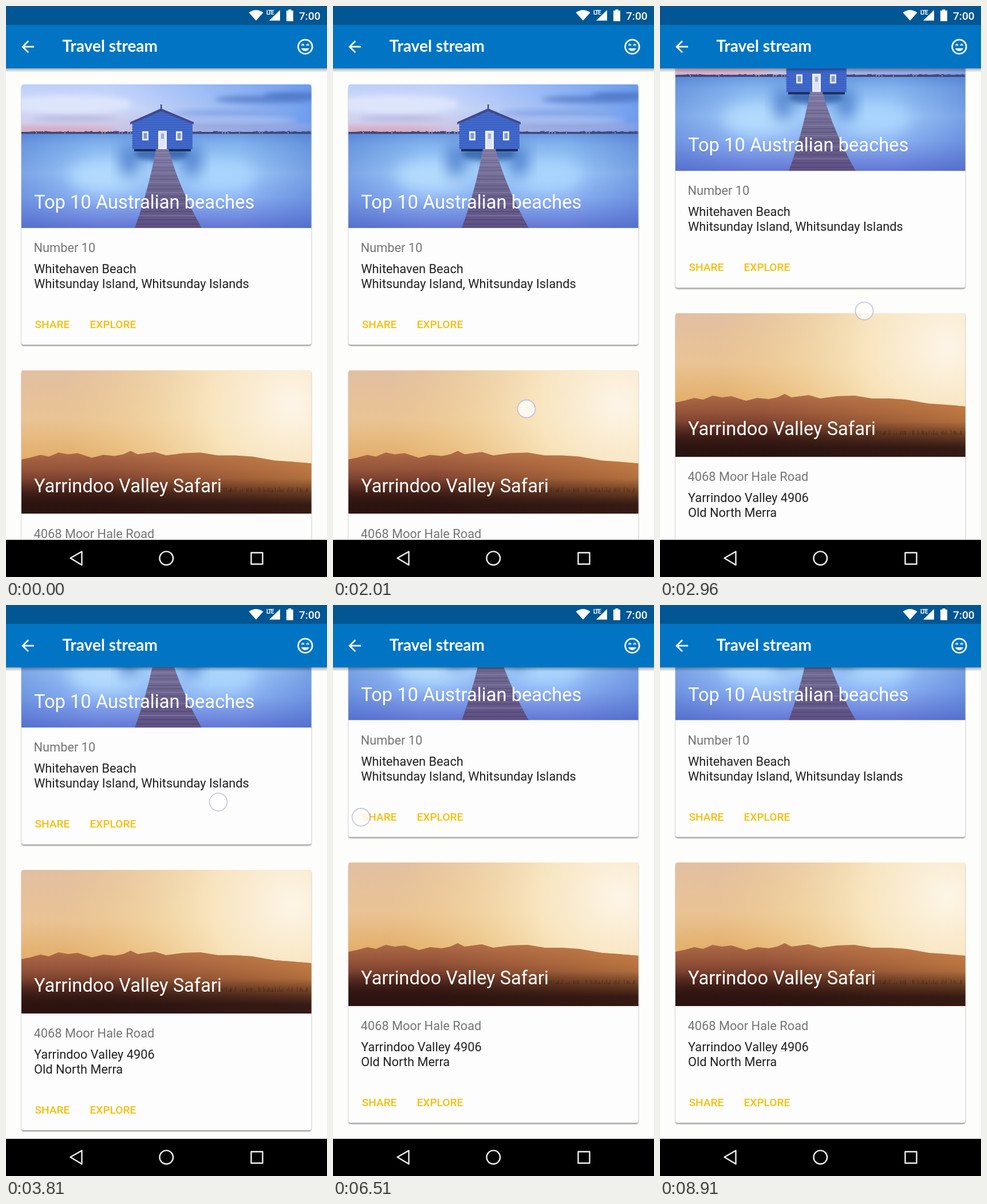
These frames come from a looping animation (561 px wide and 998 px high, 9450 ms). An HTML page:

```html
<!DOCTYPE html>
<html lang="en">
<head>
<meta charset="utf-8">
<title>Travel stream</title>
<style>
html, body { margin: 0; width: 100%; height: 100%; overflow: hidden; background: #fdfdfb; }
svg { display: block; width: 561px; height: 998px; font-family: Roboto, sans-serif; }
.head { font-size: 32.7px; fill: #fff; }
.sub { font-size: 21.8px; fill: #757575; }
.body { font-size: 21.8px; fill: #212121; }
.action { font-size: 19.1px; font-weight: 500; fill: #f6be0c; }
</style>
</head>
<body>
<svg viewBox="0 0 561 998">
  <defs>
    <linearGradient id="sky" x2="0" y2="1">
      <stop offset="0" stop-color="#bcd0fb"/><stop offset=".5" stop-color="#d3dcf8"/><stop offset="1" stop-color="#cfc0df"/>
    </linearGradient>
    <linearGradient id="skyRight">
      <stop offset=".3" stop-color="#6fa0f2" stop-opacity="0"/><stop offset="1" stop-color="#5c92ec" stop-opacity=".85"/>
    </linearGradient>
    <linearGradient id="water" x2="0" y2="1">
      <stop offset="0" stop-color="#6a9be2"/><stop offset=".12" stop-color="#84b4ee"/><stop offset=".42" stop-color="#9fcbfa"/>
      <stop offset=".68" stop-color="#8cb2f3"/><stop offset="1" stop-color="#6376d4"/>
    </linearGradient>
    <linearGradient id="edges">
      <stop offset="0" stop-color="#3f66c4" stop-opacity=".38"/><stop offset=".25" stop-color="#3f66c4" stop-opacity="0"/>
      <stop offset=".75" stop-color="#3f66c4" stop-opacity="0"/><stop offset="1" stop-color="#3f66c4" stop-opacity=".42"/>
    </linearGradient>
    <linearGradient id="jetty" x2="0" y2="1">
      <stop offset="0" stop-color="#8680ab"/><stop offset=".5" stop-color="#6d678f"/><stop offset="1" stop-color="#5f5084"/>
    </linearGradient>
    <linearGradient id="dusk" x2="0" y2="1">
      <stop offset="0" stop-color="#e2bfa2"/><stop offset=".35" stop-color="#e9c394"/><stop offset=".62" stop-color="#e3ae69"/>
    </linearGradient>
    <radialGradient id="glow" gradientUnits="userSpaceOnUse" cx="500" cy="60" r="400">
      <stop offset="0" stop-color="#fdf5e8"/><stop offset=".35" stop-color="#fbebc6" stop-opacity=".85"/><stop offset="1" stop-color="#f6d48e" stop-opacity="0"/>
    </radialGradient>
    <linearGradient id="hills" gradientUnits="userSpaceOnUse" x1="0" y1="142" x2="0" y2="251">
      <stop offset="0" stop-color="#ae6b48"/><stop offset=".3" stop-color="#945239"/><stop offset=".55" stop-color="#6a3728"/>
      <stop offset=".75" stop-color="#42201a"/><stop offset="1" stop-color="#2a1110"/>
    </linearGradient>
    <linearGradient id="hillLight">
      <stop offset=".3" stop-color="#d88e45" stop-opacity="0"/><stop offset="1" stop-color="#dc9348" stop-opacity=".55"/>
    </linearGradient>
    <linearGradient id="ground" gradientUnits="userSpaceOnUse" x1="0" y1="190" x2="0" y2="235">
      <stop offset="0" stop-color="#35180f" stop-opacity="0"/><stop offset="1" stop-color="#2c1310" stop-opacity=".9"/>
    </linearGradient>
    <linearGradient id="drop" x2="0" y2="1">
      <stop offset="0" stop-color="#000" stop-opacity=".32"/><stop offset="1" stop-color="#000" stop-opacity="0"/>
    </linearGradient>
    <filter id="soft" x="-30%" y="-60%" width="160%" height="220%"><feGaussianBlur stdDeviation="5"/></filter>
    <filter id="blur" x="-50%" y="-50%" width="200%" height="200%"><feGaussianBlur stdDeviation="13"/></filter>
    <filter id="shade" x="-5%" y="-5%" width="110%" height="110%"><feGaussianBlur stdDeviation="1.3"/></filter>
    <clipPath id="photo"><path d="M27 251V4q0-4 4-4H529.500q4 0 4 4V251z"/></clipPath>
    <clipPath id="list"><rect y="109" width="561" height="824"/></clipPath>
  </defs>

  <rect width="561" height="998" fill="#fdfdfb"/>
  <g clip-path="url(#list)"><g id="stream"></g></g>

  <rect y="109" width="561" height="7" fill="url(#drop)"/>
  <rect width="561" height="109" fill="#0175c4"/>
  <rect width="561" height="33" fill="#015693"/>
  <g fill="#fff">
    <path d="M437 25.500 424.500 11.500q12.500-9 25 0z"/>
    <path d="M460 25.500 479 7V25.500z"/>
    <path d="M453 4h16v12h-16z" fill="#015693"/>
    <text x="455" y="15" font-size="10" font-weight="700" letter-spacing="-1.3">LTE</text>
    <path d="M490 8h3.500V6h5V8H502V26.500H490z"/>
    <text x="512" y="24" font-size="19.100" font-weight="500">7:00</text>
    <path transform="translate(21.700 54.800) scale(1.364)" d="M20 11H7.830l5.590-5.590L12 4l-8 8 8 8 1.410-1.410L7.830 13H20z"/>
    <text x="98.500" y="80" font-size="28" font-weight="700" font-family="Lato, Inter, sans-serif">Travel stream</text>
    <g transform="translate(506.600 54.800) scale(1.364)">
      <circle cx="12" cy="12" r="9" fill="none" stroke="#fff" stroke-width="2"/>
      <path d="M8.880 7.820 11 9.940 9.940 11 8.880 9.940 7.820 11 6.760 9.940zM15.120 7.820l2.120 2.120L16.180 11l-1.060-1.060L14.060 11 13 9.940zM12 17.500c2.330 0 4.310-1.460 5.110-3.500H6.890c.8 2.040 2.780 3.500 5.110 3.500z"/>
    </g>
  </g>

  <rect y="933" width="561" height="65"/>
  <g fill="none" stroke="#f0f0f0" stroke-width="2.400" stroke-linejoin="round">
    <path d="M112.500 965 132.500 953.500V977z"/>
    <circle cx="280.300" cy="965.200" r="11.800"/>
    <rect x="428.500" y="955.500" width="20" height="20"/>
  </g>

  <g id="dot">
    <circle r="15.500" fill="#fff" fill-opacity=".76"/>
    <circle r="15.500" fill="none" stroke="#a2a6cf" stroke-opacity=".6" stroke-width="1.800"/>
  </g>
</svg>
<script>
const LOOP = 9450;
const $ = id => document.getElementById(id);
const rect = (x, y, w, h, fill, more = '') =>
  `<rect x="${x}" y="${y}" width="${w}" height="${h}" fill="${fill}" ${more}/>`;
const path = (d, fill, more = '') => `<path d="${d}" fill="${fill}" ${more}/>`;
const blob = (x, y, rx, ry, fill, more) =>
  `<ellipse cx="${x}" cy="${y}" rx="${rx}" ry="${ry}" fill="${fill}" ${more}/>`;
const text = (cls, x, y, s) => `<text class="${cls}" x="${x}" y="${y}">${s}</text>`;
const bend = (a, b, c, k) => (1 - k) ** 2 * a + 2 * k * (1 - k) * b + k * k * c;

let seed = 7;
const rnd = () => (seed = seed * 16807 % 2147483647) / 2147483647;

function beach() {
  const soft = 'filter="url(#soft)"', wide = 'filter="url(#blur)"';
  let s = rect(27, 0, 507, 86, 'url(#sky)') + rect(27, 0, 507, 86, 'url(#skyRight)');
  s += blob(75, 79, 120, 5, '#dba5ba', soft) + blob(110, 34, 110, 15, '#dde5fb', soft);
  s += blob(450, 26, 85, 6, '#5b82cd', soft) + blob(505, 20, 55, 6, '#4f77c8', soft);
  s += blob(390, 50, 100, 5, '#86a6e6', soft) + blob(120, 60, 75, 4, '#b4b6de', soft);
  s += blob(420, 74, 120, 6, '#9aa8de', soft) + blob(420, 62, 90, 4, '#a9c2f3', soft);
  s += rect(27, 86, 507, 165, 'url(#water)') + rect(27, 86, 507, 165, 'url(#edges)');
  s += blob(175, 160, 65, 28, '#b3dafd', wide) + blob(375, 160, 60, 28, '#a9d4fd', wide);
  s += blob(215, 133, 16, 30, '#3f72c4', wide + ' opacity=".8"');
  s += blob(325, 133, 16, 30, '#3f72c4', wide + ' opacity=".8"');
  s += blob(272, 122, 48, 12, '#28559f', soft + ' opacity=".75"');
  s += rect(27, 83, 507, 3.5, '#3e4878');
  for (let x = 27; x < 533; x += 5) {
    const h = .5 + rnd() * 2;
    s += rect(x, 84 - h, 3 + rnd() * 3, h, '#474b78');
    if (rnd() < .25) s += rect(x, 84, 2, 1.3, '#d7b4b4');
  }
  // stilts, walls and roof
  s += rect(224, 112, 99, 5, '#1b2b58');
  s += path('M221 68 271 44 326 68V113H221z', '#4169ce');
  for (let y = 50; y < 112; y += 4) {
    const w = Math.min(52, (y - 42) * 2.1);
    s += rect(272 - w, y, 2 * w, .9, '#3558b4');
  }
  s += path('M271 42 217 66V70L271 47 328 70V66z', '#414a8c');
  s += rect(270, 35, 2.4, 9, '#414a7f');
  for (const x of [238, 297]) {
    s += rect(x, 82, 11, 16, '#e8eefb') + rect(x + 2.5, 85, 6, 10, '#8299c8');
  }
  s += rect(266, 81, 15, 32, '#f1f3fc') + rect(268.5, 84, 10, 27, '#dfe5f7') + rect(271, 86, 5, 9, '#9db0d7');
  // jetty with boards that widen towards the viewer
  s += path('M262 113H284Q303 182 342 251H225Q250 182 262 113z', 'url(#jetty)');
  for (let i = 0; i < 27; i++) {
    const k = (i / 27) ** 1.5, x = bend(262, 250, 225, k);
    s += rect(x, 114 + 137 * k, bend(284, 303, 342, k) - x, .5 + 1.1 * k, i % 3 ? '#463e6b' : '#9a92b8', 'opacity=".6"');
  }
  return s;
}

function sunset() {
  const ridge = '27 156 42 153 60 148 75 151 92 144 108 147 125 145 150 153 170 148 190 150 205 147 218 141 230 147 260 143 280 149 310 145 340 144 370 149 400 149 430 151 470 158 500 160 534 163';
  const d = `M${ridge}V251H27z`;
  let s = rect(27, 0, 507, 251, 'url(#dusk)') + rect(27, 0, 507, 251, 'url(#glow)');
  s += path(d, 'url(#hills)') + path(d, 'url(#hillLight)');
  for (let i = 0; i < 60; i++) {
    const h = 2 + rnd() * 7;
    s += rect(350 + rnd() * 182, 213 - h, 1.2, h, '#4a2817', 'opacity=".5"');
  }
  return s + rect(27, 190, 507, 61, 'url(#ground)');
}

function card(y, photo, headY, head, sub, one, two) {
  return `<g transform="translate(0 ${y})">` +
    rect(27, 2, 506.5, 455, '#000', 'rx="4" opacity=".42" filter="url(#shade)"') +
    rect(27, 0, 506.5, 455, '#fdfdfd', 'rx="4"') +
    `<g clip-path="url(#photo)">${photo}</g>` +
    text('head', 49, headY, head) + text('sub', 48.5, 293, sub) +
    text('body', 49, 330, one) + text('body', 49, 356, two) +
    text('action', 50.5, 426, 'SHARE') + text('action', 146.5, 426, 'EXPLORE') + '</g>';
}

$('stream').innerHTML =
  card(137, beach(), 217, 'Top 10 Australian beaches', 'Number 10', 'Whitehaven Beach', 'Whitsunday Island, Whitsunday Islands') +
  card(636.5, sunset(), 213, 'Yarrindoo Valley Safari', '4068 Moor Hale Road', 'Yarrindoo Valley 4906', 'Old North Merra');

// Keys are [time, value]; slopes vanish at rests and ends.
function track(keys, t) {
  const n = keys.length - 1;
  if (t <= keys[0][0]) return keys[0][1];
  if (t >= keys[n][0]) return keys[n][1];
  const i = keys.findIndex(k => k[0] > t) - 1;
  const rate = j => (keys[j + 1][1] - keys[j][1]) / (keys[j + 1][0] - keys[j][0]);
  const slope = j => {
    if (j < 1 || j >= n) return 0;
    const a = rate(j - 1), b = rate(j);
    return a * b > 0 ? 2 * a * b / (a + b) : 0;
  };
  const [t0, a] = keys[i], [t1, b] = keys[i + 1], w = t1 - t0, u = (t - t0) / w;
  return a + (b - a) * u * u * (3 - 2 * u) + w * u * (1 - u) * (slope(i) * (1 - u) - slope(i + 1) * u);
}

const scroll = [[2100, 0], [2960, 99.5], [4200, 186.5]];
const dotX = [[2100, 338], [2960, 357], [4250, 374], [4800, 374], [5220, 277], [5820, 120], [6420, 49],
  [7100, 49], [7430, 102], [7800, 102], [7960, 177]];
const dotY = [[2100, 704], [2960, 533], [4250, 300.5], [4800, 300.5], [5820, 355], [6420, 371], [7100, 371], [7960, 369]];
const dotAlpha = [[1850, 0], [1960, 1], [8160, 1], [8700, 0]];

function draw(t) {
  $('stream').setAttribute('transform', `translate(0 ${-track(scroll, t)})`);
  $('dot').setAttribute('transform', `translate(${track(dotX, t)} ${track(dotY, t)})`);
  $('dot').setAttribute('opacity', track(dotAlpha, t));
}

const start = performance.now();
function tick() {
  draw((performance.now() - start) % LOOP);
  requestAnimationFrame(tick);
}
draw(0);
requestAnimationFrame(tick);
</script>
</body>
</html>
```
